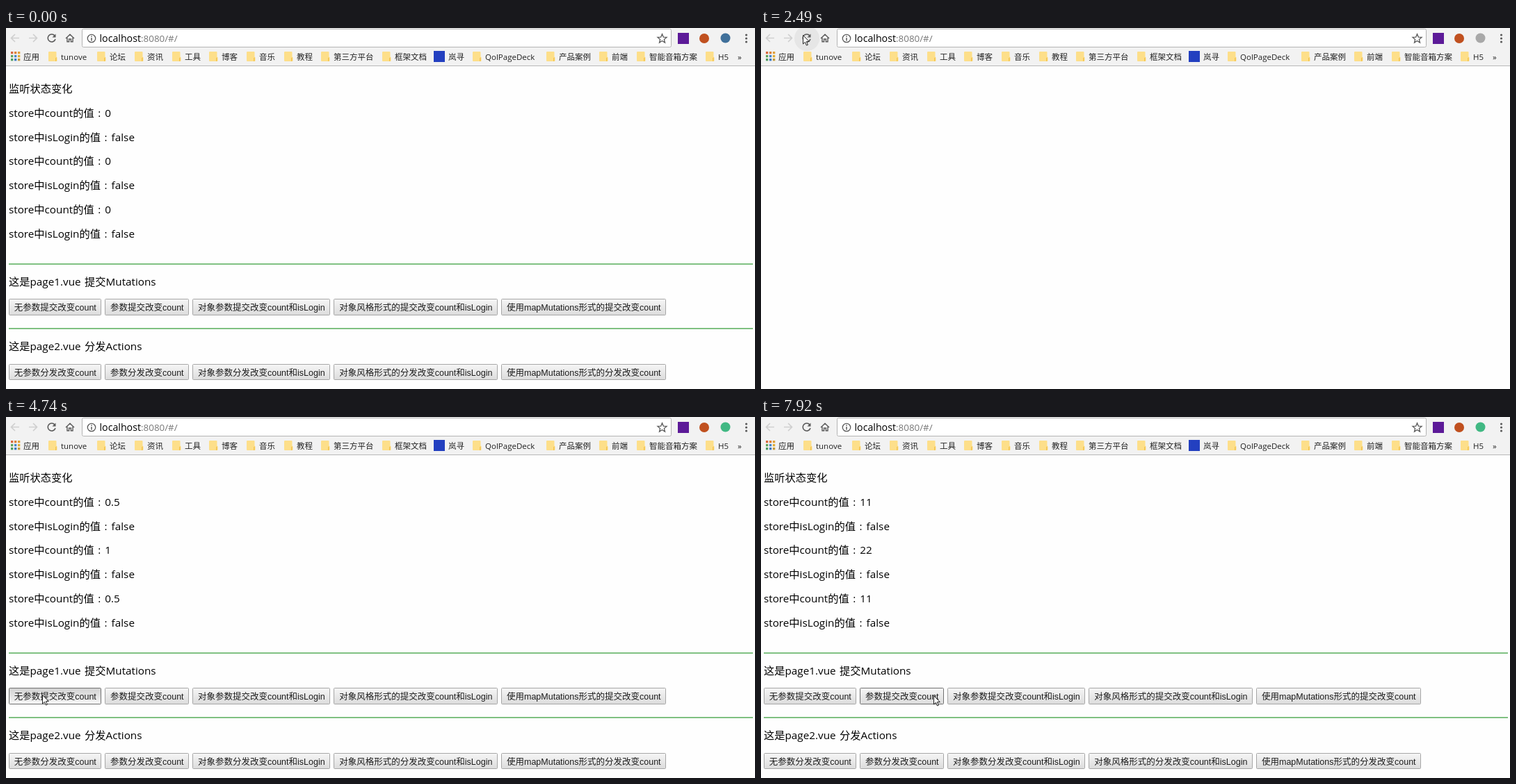
These frames come from a looping animation (1077 px wide and 520 px high, 8000 ms). An HTML page:

```html
<!DOCTYPE html>
<html lang="zh-CN">
<head>
<meta charset="utf-8">
<style>
html, body { margin: 0; width: 100%; height: 100%; overflow: hidden; background: #fefefe; }
svg { display: block; width: 1077px; height: 520px; }
text { font: 15.25px "Open Sans", "Noto Sans CJK SC", "Noto Sans CJK", sans-serif; fill: #000; white-space: pre; }
.mark { font-size: 11.5px; fill: #222; }
.btn { font: 12.5px "Liberation Sans", "Noto Sans CJK SC", "Noto Sans CJK", sans-serif; text-anchor: middle; fill: #1c1c1c; }
.icon { fill: none; stroke: #5a5a5a; stroke-width: 1.6; }
</style>
</head>
<body>
<svg viewBox="0 0 1077 520">
  <defs>
    <linearGradient id="up" x2="0" y2="1"><stop stop-color="#f6f6f6"/><stop offset="1" stop-color="#dcdcdc"/></linearGradient>
    <linearGradient id="down" x2="0" y2="1"><stop stop-color="#d2d2d2"/><stop offset="1" stop-color="#f6f6f6"/></linearGradient>
  </defs>
  <rect width="1077" height="54" fill="#f2f2f2"/>
  <rect y="54" width="1077" height="1" fill="#b8b8b8"/>
  <g fill="#e6e6e6">
    <circle id="homeHover" cx="92" cy="15" r="17"/>
    <circle id="reloadHover" cx="66" cy="15" r="18"/>
    <rect id="markHover" x="54" y="30" width="70" height="23" rx="2"/>
  </g>
  <rect x="109.5" y="1.5" width="847" height="26" rx="2" fill="#fff" stroke="#b4b4b4"/>
  <g class="icon">
    <path d="M19 14.5H7.5M13 9L7.5 14.5L13 20M33 14.5H44.5M39 9L44.5 14.5L39 20" stroke="#cfcfcf"/>
    <path d="M70 11A5.5 5.5 0 1 0 71 16"/>
    <path d="M71.5 8.5V13.5H66.5Z" fill="#5a5a5a" stroke="none"/>
    <path d="M86 15L92 9.3L98 15M88 14V19.7H90.6V16H93.4V19.7H96V14" stroke-width="1.4"/>
    <circle cx="123" cy="15" r="5.7" stroke-width="1.3"/>
    <path d="M123 14V18.5M123 11.3V12.8" stroke-width="1.5"/>
    <path id="star" stroke-width="1.3"/>
  </g>
  <text x="134.5" y="19.8" style="font-size:14.2px">localhost</text>
  <text x="194" y="19.8" style="font-size:13.4px;fill:#777">:8080/#/</text>
  <rect x="966" y="7" width="16" height="16" fill="#5c1a98"/>
  <circle cx="1004" cy="15" r="7" fill="#c0501f"/>
  <circle id="tool" cx="1034.5" cy="14.5" r="7"/>
  <g fill="#5a5a5a"><circle cx="1064.5" cy="10" r="1.6"/><circle cx="1064.5" cy="15" r="1.6"/><circle cx="1064.5" cy="20" r="1.6"/></g>
  <g id="marks"></g>
  <g id="page"></g>
  <path id="cursor" d="M.5 .5V13L3.4 10.3L5.4 15L7.4 14.2L5.4 9.6H9.3Z" fill="#fff" stroke="#222"/>
</svg>
<script>
const $ = id => document.getElementById(id);

function add(parent, tag, attrs, html = '') {
  const el = document.createElementNS('http://www.w3.org/2000/svg', tag);
  for (const key in attrs) el.setAttribute(key, attrs[key]);
  el.innerHTML = html;
  return parent.appendChild(el);
}
const show = (id, on) => $(id).setAttribute('visibility', on ? 'visible' : 'hidden');

const star = Array.from({length: 10}, (_, i) => {
  const r = i % 2 ? 3 : 6.8, a = i * Math.PI / 5;
  return [943.5 + r * Math.sin(a), 15.5 - r * Math.cos(a)].map(v => v.toFixed(1));
});
$('star').setAttribute('d', 'M' + star.join('L') + 'Z');

// Bookmarks
const marks = $('marks'), page = $('page');
const appColors = ['#d9683f', '#dd8232', '#dfa03a', '#62a45c', '#4a86c8', '#e0ac34', '#4f9c60', '#3d78c0', '#c29a3a'];
appColors.forEach((fill, i) => add(marks, 'rect',
  {x: 7 + i % 3 * 5, y: 34 + Math.floor(i / 3) * 5, width: 3.3, height: 3.3, fill}));

const bookmarks = [[25, '应用'], [79, 'tunove'], [149, '论坛'], [203, '资讯'], [257, '工具'], [310, '博客'],
  [364, '音乐'], [418, '教程'], [471, '第三方平台'], [559, '框架文档'], [636, '岚寻'], [689, 'QolPageDeck'],
  [795, '产品案例'], [871, '前端'], [925, '智能音箱方案'], [1024, 'H5'], [1052, '»']];
bookmarks.forEach(([x, label], i) => {
  add(marks, 'text', {x, y: 46, class: 'mark'}, label);
  if (i === 10) add(marks, 'rect', {x: 615, y: 33, width: 16, height: 16, fill: '#2340c0'});
  else if (i && i < 16) {
    add(marks, 'path', {d: `M${x - 18} 35q0-1 1-1h9.5q1 0 1 1v6.5l1 1v4.5q0 1-1 1h-10.5q-1 0-1-1z`, fill: '#fddf8a'});
    add(marks, 'path', {d: `M${x - 8} 48v-4.5l1.6-1.5v5q0 1-1.6 1z`, fill: '#f3c44f'});
  }
});

// Page
const line = (y, html, x = 4) => add(page, 'text', {x, y}, html);
// A centred full-width colon
const field = name => `store中${name}的值<tspan dx="5.6">:</tspan><tspan class="value" dx="6">false</tspan>`;
line(93.4, '监听状态变化');
for (let i = 0; i < 6; i++) line(128 + i * 34.7, field(i % 2 ? 'isLogin' : 'count'));
const counts = [...page.querySelectorAll('.value')].filter((_, i) => i % 2 === 0);

const edges = [[4, 137], [142, 263], [268, 466], [471, 707], [712, 949]];
const buttons = [];
[[339.2, 'page1', '提交', 'Mutations'], [432.1, 'page2', '分发', 'Actions']].forEach(([y, name, verb, kind], row) => {
  add(page, 'rect', {x: 4, y, width: 1070, height: 1.6, fill: '#62b264'});
  line(y + 32.2, `这是${name}.vue`);
  line(y + 32.2, verb + kind, 113);
  const top = row ? 484 : 390, height = row ? 22 : 23;
  const labels = [`无参数${verb}改变count`, `参数${verb}改变count`, `对象参数${verb}改变count和isLogin`,
    `对象风格形式的${verb}改变count和isLogin`, `使用mapMutations形式的${verb}改变count`];
  labels.forEach((label, i) => {
    const [left, right] = edges[i];
    const box = add(page, 'rect', {x: left + .5, y: top + .5, width: right - left - 1, height, rx: 1});
    add(page, 'text', {x: (left + right) / 2 + .3, y: top + 16.8, class: 'btn'}, label);
    buttons.push({box, left, right, top});
  });
});

// Pointer runs: start, end, steps, from x, y, to x, y
const runs = [
  [520, 1300, 11, 862, 489, 121, 54],
  [1400, 2020, 9, 120, 42, 60, 10],
  [2660, 3440, 11, 60, 14, 52, 396],
  [3580, 3835, 4, 52, 398, 52, 405],
  [3920, 3920, 1, 52, 400, 52, 400],
  [5150, 5290, 3, 110, 406, 190, 416],
  [5430, 5520, 2, 200, 417, 211, 417],
  [5660, 5830, 3, 212, 417, 212, 413],
  [6440, 6440, 1, 211, 408, 211, 408],
  [6680, 6750, 2, 211, 405, 211, 402],
  [7840, 7920, 2, 228, 402, 248, 401]
];
// Clicks: press, release, count afterwards
const clicks = [[3920, 4140, 1], [4740, 4890, 2], [6820, 6990, 12], [7460, 7620, 22]];

function pointer(t) {
  const run = runs.findLast(r => t >= r[0]);
  if (!run) return null;
  const [start, end, n, x0, y0, x1, y1] = run;
  const p = n > 1 ? Math.min(1, Math.floor((t - start + 5) / (end - start) * (n - 1)) / (n - 1)) : 1;
  const e = 1 - (1 - p) ** 2;
  return [Math.round(x0 + (x1 - x0) * e), Math.round(y0 + (y1 - y0) * e)];
}

function draw(t) {
  const within = (a, b) => t >= a && t < b;
  const at = pointer(t);
  show('cursor', at);
  if (at) $('cursor').setAttribute('transform', `translate(${at})`);
  show('homeHover', within(1560, 1790));
  show('markHover', within(1480, 1720));
  show('reloadHover', within(1790, 2735));

  const loading = within(2420, 2660);
  show('page', !loading);
  $('tool').setAttribute('fill', loading ? '#a8a8a8' : t < 2420 ? '#40709a' : '#41b883');

  const count = clicks.findLast(c => t >= c[1])?.[2] ?? 0;
  counts.forEach((el, i) => el.textContent = i === 1 ? count : count / 2);

  const pressed = clicks.some(c => within(c[0], c[1]));
  buttons.forEach(({box, left, right, top}) => {
    const hover = at && t >= 2660 && at[0] >= left && at[0] < right && at[1] >= top && at[1] < top + 22;
    box.setAttribute('stroke', hover ? '#707070' : '#a6a6a6');
    box.setAttribute('fill', hover && pressed ? 'url(#down)' : 'url(#up)');
  });
}

let began;
function tick(now) {
  began ??= now;
  draw((now - began) % 8000);
  requestAnimationFrame(tick);
}
draw(0);
requestAnimationFrame(tick);
</script>
</body>
</html>
```
